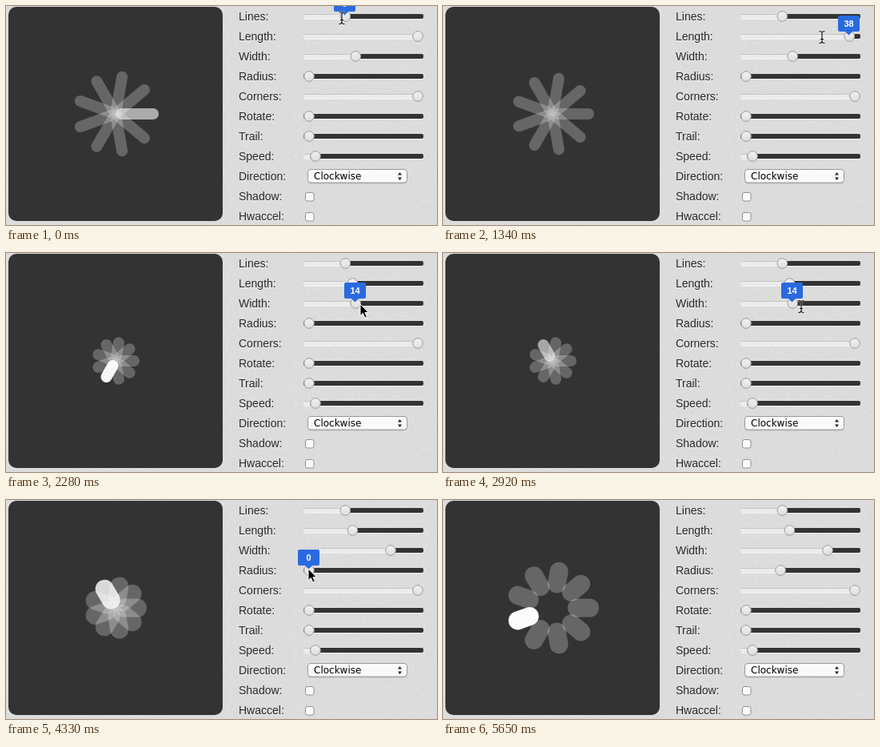
Write an HTML page that moves like this. It is 539 by 274 pixels and loops after 5790 ms.

```html
<!DOCTYPE html>
<html lang="en">
<head>
<meta charset="utf-8">
<title>Spinner settings</title>
<style>
  html, body { margin: 0; width: 100%; height: 100%; overflow: hidden; background: #dcdcdc; }
  svg { display: block; width: 539px; height: 274px; }
  .label { font: 14px "Liberation Sans", Arial, sans-serif; fill: #262626; text-shadow: 0 1px 0 rgba(255, 255, 255, .7); }
  .choice { font: 12px "DejaVu Sans", sans-serif; fill: #000; }
  .value { font: bold 11px "Liberation Sans", Arial, sans-serif; fill: #fff; text-anchor: middle; }
</style>
</head>
<body>
<svg id="stage" viewBox="0 0 539 274">
  <defs>
    <linearGradient id="knobFill" x2="0" y2="1">
      <stop stop-color="#f2f2f2"/><stop offset="1" stop-color="#dedede"/>
    </linearGradient>
    <linearGradient id="boxFill" x2="0" y2="1">
      <stop stop-color="#fff"/><stop offset=".5" stop-color="#f8f8f8"/><stop offset="1" stop-color="#fdfdfd"/>
    </linearGradient>
  </defs>
  <rect width="539" height="274" fill="#dcdcdc"/>
  <g id="texture" fill="none"></g>
  <rect x="3" y="1" width="268" height="268" rx="10" fill="#333"/>
  <g id="spinner" fill="#fff" transform="translate(137 135)"></g>
  <g id="panel"></g>
  <g id="tip">
    <path d="M-11.5-27h23q2 0 2 2v16q0 2-2 2H4.500L0-2.500-4.500-7h-7q-2 0-2-2v-16q0-2 2-2z" fill="#2a6ae0"/>
    <text class="value" y="-13"></text>
  </g>
  <path id="arrow" d="M0 0V14.500L3.300 11.400 5.800 17 8.300 15.900 5.900 10.500H10.300Z"
        fill="#000" stroke="#fff" stroke-width="1"/>
  <g id="beam" fill="none">
    <path d="M-3.500-7.500Q0-7.500 0-5V5Q0 7.500-3.500 7.500M3.500-7.500Q0-7.500 0-5M3.500 7.500Q0 7.500 0 5M-2 2.500H2"
          stroke="#fff" stroke-width="2.600" opacity=".55"/>
    <path d="M-3.500-7.500Q0-7.500 0-5V5Q0 7.500-3.500 7.500M3.500-7.500Q0-7.500 0-5M3.500 7.500Q0 7.500 0 5M-2 2.500H2"
          stroke="#111" stroke-width="1.200"/>
  </g>
</svg>
<script>
const LOOP = 5790, PERIOD = 1000 / 0.6, LINES = 9, DIM = 0.25, TRAIL = 0.1;
const $ = id => document.getElementById(id);

function add(parent, tag, attrs, text) {
  const el = document.createElementNS('http://www.w3.org/2000/svg', tag);
  set(el, attrs);
  if (text) el.textContent = text;
  parent.appendChild(el);
  return el;
}
function set(el, attrs) {
  for (const k in attrs) el.setAttribute(k, attrs[k]);
}

// Screen refreshes: first, last, count
const ticks = [0];
[[60, 630, 11], [690, 1220, 10], [1280, 1800, 10], [1860, 2400, 10], [2460, 2980, 10],
 [3040, 3570, 10], [3630, 4160, 10], [4210, 4750, 10], [4810, 5350, 10], [5410, 5650, 5]]
  .forEach(([a, b, n]) => {
    for (let i = 0; i < n; i++) ticks.push(Math.round((a + i * (b - a) / (n - 1)) / 10) * 10);
  });

// Each change of a setting restarts the spinner
const changes = [
  [1340, 'Length', 38], [1395, 'Length', 33], [1453, 'Length', 27], [1510, 'Length', 22],
  [1570, 'Length', 19], [1630, 'Length', 17], [1713, 'Length', 16],
  [2975, 'Width', 17], [3035, 'Width', 20], [3095, 'Width', 22], [3178, 'Width', 23],
  [4570, 'Radius', 1], [4630, 'Radius', 4], [4690, 'Radius', 8], [4750, 'Radius', 13],
  [4810, 'Radius', 16], [4870, 'Radius', 18], [4905, 'Radius', 19]
];
const tips = [[0, 110, 'Lines'], [570, 1970, 'Length'], [2150, 3620, 'Width'], [4030, 5090, 'Radius']];
const beams = [[0, 520], [1310, 1600], [2900, 3130]];
const pointer = [
  [0, 420, 15], [300, 468, 28], [560, 513, 33], [1220, 514, 35], [1280, 505, 37], [1340, 474, 39],
  [1450, 443, 39], [1740, 433, 38], [1900, 433, 42], [2100, 440, 60], [2280, 443, 64], [2860, 441, 63],
  [2920, 448, 67], [3040, 476, 66], [3180, 480, 63], [3560, 480, 63], [3630, 455, 66], [3750, 392, 76],
  [3900, 379, 84], [4500, 378, 87], [4690, 408, 88], [4750, 420, 89], [5000, 421, 90], [5350, 444, 276]
];

// name: [min, max, initial]
const settings = {
  Lines: [5, 17, 9], Length: [0, 40, 40], Width: [2, 30, 14], Radius: [0, 60, 0],
  Corners: [0, 1, 1], Rotate: [0, 90, 0], Trail: [10, 100, 10], Speed: [0.5, 2.2, 0.6]
};

function drawTexture() {
  let seed = 7;
  const rnd = () => (seed = seed * 16807 % 2147483647) / 2147483647;
  const flecks = (n, len) => {
    let d = '';
    for (let i = 0; i < n; i++) {
      const l = 0.5 + rnd() * len;
      d += `M${(rnd() * 539).toFixed(1)} ${(rnd() * 274).toFixed(1)}l${l.toFixed(1)} ${(l * (0.4 + rnd())).toFixed(1)}`;
    }
    return d;
  };
  add($('texture'), 'path', { d: flecks(1500, 2.5), stroke: '#fff', opacity: 0.3 });
  add($('texture'), 'path', { d: flecks(1100, 2), stroke: '#000', opacity: 0.035 });
}

const sliders = {};
function drawPanel() {
  const panel = $('panel');
  const label = (name, row) => add(panel, 'text', { class: 'label', x: 291, y: 18 + 25 * row }, name + ':');
  Object.keys(settings).forEach((name, row) => {
    const y = 13 + 25 * row;
    label(name, row);
    add(panel, 'rect', { x: 372, y: y - 2, width: 150, height: 6, rx: 2, fill: '#fff', opacity: 0.6 });
    add(panel, 'rect', { x: 372, y: y - 3, width: 150, height: 6, rx: 2, fill: '#333' });
    const fill = add(panel, 'rect', { x: 372, y: y - 3, height: 6, rx: 1, fill: '#ececec' });
    const edge = add(panel, 'rect', { x: 372, y: y - 3, height: 1, fill: '#c4c4c4' });
    const knob = add(panel, 'circle', { cy: y, r: 6.3, fill: 'url(#knobFill)', stroke: '#999' });
    sliders[name] = { y, fill, edge, knob };
  });
  ['Direction', 'Shadow', 'Hwaccel'].forEach((name, i) => label(name, 8 + i));

  add(panel, 'rect', { x: 377.5, y: 205.5, width: 124, height: 17, rx: 3.5, fill: '#000', opacity: 0.12 });
  add(panel, 'rect', { x: 377.5, y: 204.5, width: 124, height: 16.5, rx: 3.5, fill: 'url(#boxFill)', stroke: '#989898' });
  add(panel, 'text', { class: 'choice', x: 385, y: 217 }, 'Clockwise');
  add(panel, 'path', { d: 'M490 211.500h5l-2.500-3.500zM490 214.500h5l-2.500 3.500z', fill: '#222' });
  [233.5, 258.5].forEach(y =>
    add(panel, 'rect', { x: 374.5, y, width: 10.5, height: 10.5, rx: 2.5, fill: 'url(#boxFill)', stroke: '#8f8f8f' }));
}

const part = (name, v) => (v - settings[name][0]) / (settings[name][1] - settings[name][0]);
const inside = t => ([a, b]) => t >= a && t < b;

function pointerAt(t) {
  const i = pointer.findIndex(p => p[0] > t);
  if (i < 1) return null;
  const [a, ax, ay] = pointer[i - 1], [b, bx, by] = pointer[i];
  const k = (t - a) / (b - a);
  return [ax + (bx - ax) * k, ay + (by - ay) * k];
}

const spokes = [];
function drawSpinner(v, age) {
  const w = v.Width;
  spokes.forEach((el, i) => {
    const phase = age / PERIOD - i / LINES;
    const d = phase - Math.floor(phase);
    const lit = age > 1 && d < TRAIL;
    set(el, {
      x: v.Radius, y: -w / 2, width: v.Length + w, height: w, rx: w / 2,
      opacity: lit ? 1 - (1 - DIM) * d / TRAIL : DIM
    });
  });
}

function render(time) {
  const t = ticks.filter(k => k <= time).pop();
  const v = {};
  for (const name in settings) v[name] = settings[name][2];
  let start = -0.055 * PERIOD;
  for (const [at, name, value] of changes) {
    if (at > t) break;
    v[name] = value;
    start = at;
  }
  drawSpinner(v, t - start);

  for (const name in sliders) {
    const p = part(name, v[name]), s = sliders[name];
    set(s.fill, { width: 150 * p });
    set(s.edge, { width: 150 * p });
    set(s.knob, { cx: 379 + 136 * p });
  }

  const tip = tips.find(inside(t));
  $('tip').style.display = tip ? '' : 'none';
  if (tip) {
    const name = tip[2];
    set($('tip'), { transform: `translate(${Math.round(379 + 136 * part(name, v[name])) - 0.5} ${sliders[name].y + 1})` });
    $('tip').lastElementChild.textContent = v[name];
  }

  const pos = pointerAt(t), beam = beams.some(inside(t));
  $('arrow').style.display = pos && !beam ? '' : 'none';
  $('beam').style.display = pos && beam ? '' : 'none';
  if (pos) set($(beam ? 'beam' : 'arrow'), { transform: `translate(${pos.map(Math.round).join(' ')})` });
}

drawTexture();
drawPanel();
for (let i = 0; i < LINES; i++)
  spokes.push(add($('spinner'), 'rect', { transform: `rotate(${360 / LINES * i})` }));

const begin = performance.now();
function frame() {
  render((performance.now() - begin) % LOOP);
  requestAnimationFrame(frame);
}
frame();
</script>
</body>
</html>
```
